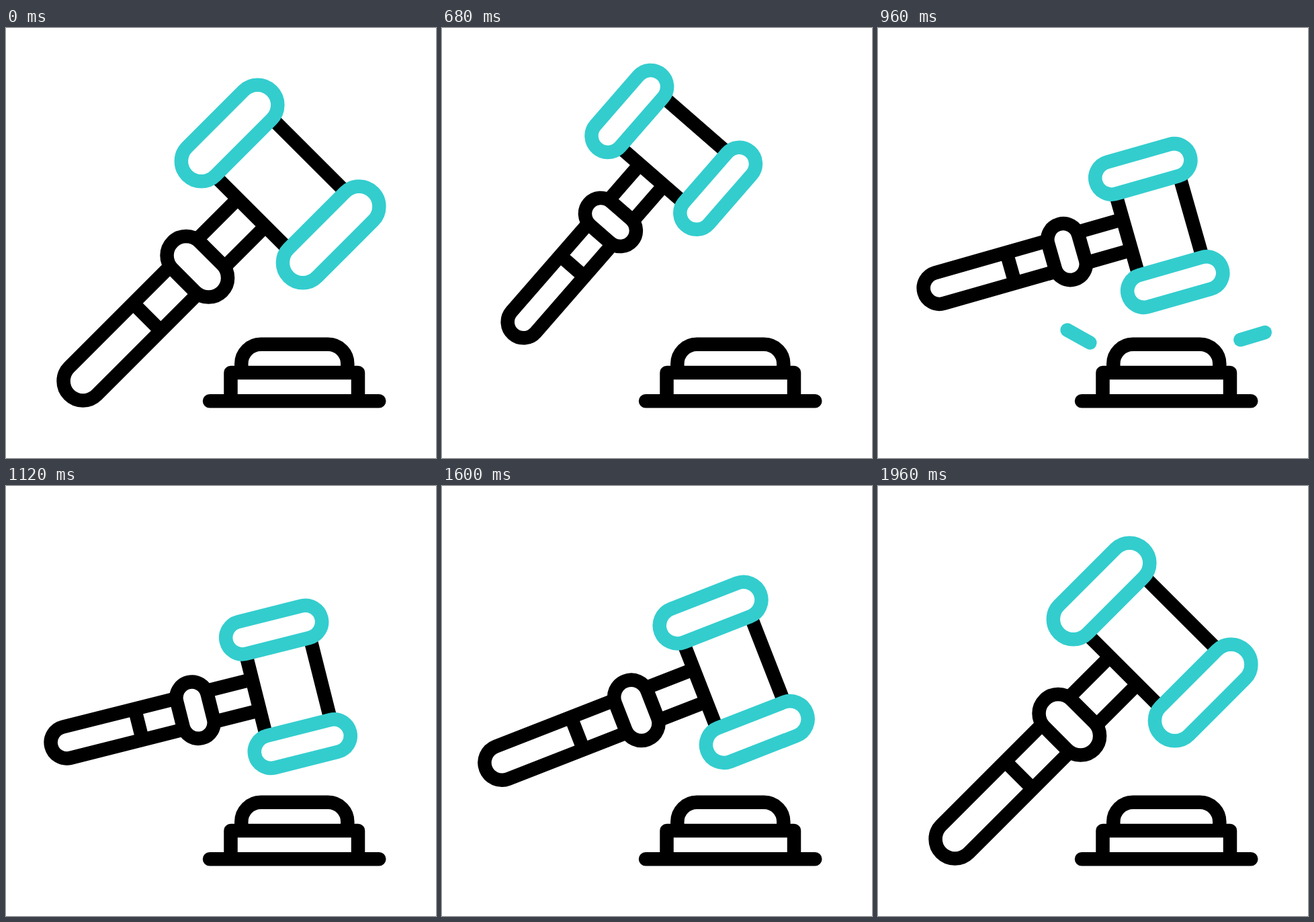
Animation, 640 px wide and 640 px high, one loop 2 s. Source, as an HTML page:

```html
<!DOCTYPE html>
<html lang="en">
<head>
<meta charset="utf-8">
<title>Gavel</title>
<style>
  html, body { margin: 0; width: 100%; height: 100%; overflow: hidden; background: #fff; }
  svg { display: block; width: 100%; height: 100%; }
  svg * { fill: none; stroke: #000; stroke-width: 20.5; vector-effect: non-scaling-stroke; }
  .round { stroke-linecap: round; stroke-linejoin: round; }
  .teal { stroke: #33cdce; }
  .solid { fill: #fff; }
</style>
</head>
<body>
<svg viewBox="0 0 640 640">
  <line id="left" class="teal round"/>
  <line id="right" class="teal round"/>

  <path class="round" d="M303 555.2H555.3M334.5 555V513H524V555"/>
  <path d="M350.3 513V500A29 29 0 0 1 379.3 470.8H479.3A29 29 0 0 1 508.3 500V513"/>

  <!-- gavel lies flat, its collar at the origin -->
  <g id="gavel">
    <path d="M114.1 -29H-240.8A29 29 0 0 0 -240.8 29H114.1M-106 -29V29"/>
    <path d="M114.1 -77V77M234.7 -77V77"/>
    <rect class="solid" x="-28.6" y="-52.2" width="57.2" height="104.4" rx="28.6"/>
    <rect class="teal solid" x="85.3" y="-136.7" width="178.2" height="59.8" rx="29.9"/>
    <rect class="teal solid" x="85.3" y="76.9" width="178.2" height="59.8" rx="29.9"/>
  </g>
</svg>
<script>
const LOOP = 2000, STEP = 40;
const FIRST_HIT = 825, SECOND_HIT = 1225;

const byId = id => document.getElementById(id);
const ramp = (t, from, to) => Math.min(1, Math.max(0, (t - from) / (to - from)));
const ease = (t, from, to) => (1 - Math.cos(Math.PI * ramp(t, from, to))) / 2;

// Lift, strike, bounce, strike again, then swing back up
function drawGavel(t) {
  const land = ease(t, 680, 850);
  const bounce = ease(t, 850, 1030) - ease(t, 1030, 1235);

  const angle = -45 - 4.4 * ease(t, 80, 620) + 49.4 * ease(t, 670, 830)
    - 23.7 * bounce - 45 * ease(t, 1300, 1921);
  const x = 284.8 - 33.9 * ease(t, 80, 548) + 34.8 * land
    - 7 * bounce + 4.5 * ease(t, 1310, 1720) - 5.4 * ease(t, 1720, 1950);
  const y = 355.3 - 66.3 * ease(t, 80, 404) + 49 * land
    - 7.3 * bounce - 4.6 * ease(t, 1310, 1560) + 21.9 * ease(t, 1570, 1900);
  const scale = 1 - 0.1815 * (ease(t, 80, 500) - ease(t, 1370, 1895));

  byId("gavel").setAttribute("transform", `translate(${x} ${y}) rotate(${angle}) scale(${scale})`);
}

// The tip shoots out along the ray; the tail follows and catches up
function drawSpark(id, x, y, dx, dy, age) {
  const tip = ramp(age, 0, 153);
  const tail = 0.4 * tip + 0.6 * ease(age, 140, 260);
  const line = byId(id);
  line.style.display = tip - tail > 0.01 ? "" : "none";
  line.setAttribute("x1", x + dx * tail);
  line.setAttribute("y1", y + dy * tail);
  line.setAttribute("x2", x + dx * tip);
  line.setAttribute("y2", y + dy * tip);
}

function draw(t) {
  const age = t - (t < SECOND_HIT ? FIRST_HIT : SECOND_HIT);
  drawGavel(t);
  drawSpark("left", 338, 481, -64, -35.7, age);
  drawSpark("right", 515, 471.4, 69, -20.7, age);
}

const start = performance.now();
function tick() {
  const t = (performance.now() - start) % LOOP;
  draw(Math.floor(t / STEP) * STEP);
  requestAnimationFrame(tick);
}
tick();
</script>
</body>
</html>
```
